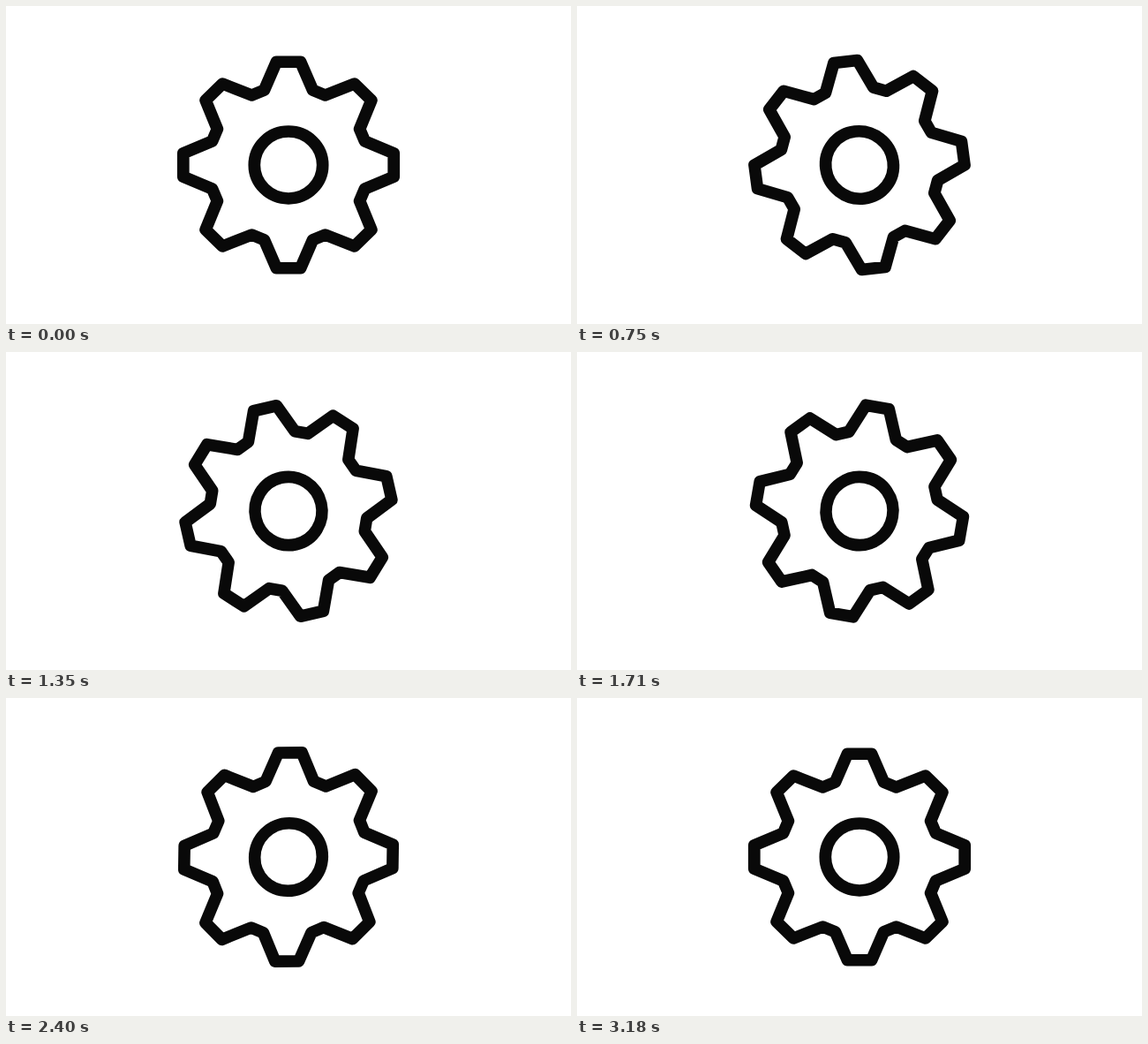
An HTML page that plays this animation: 640x360 px, repeating every 3.24 s.

```html
<!DOCTYPE html>
<html lang="en">
<head>
<meta charset="utf-8">
<title>Turning gear</title>
<style>
  html, body { margin: 0; width: 100%; height: 100%; overflow: hidden; background: #fff; }
  svg { display: block; width: 100vw; height: 100vh; }
</style>
</head>
<body>
<svg viewBox="0 0 640 360">
  <g id="gear" fill="none" stroke="#090909" stroke-width="13.6" stroke-linejoin="round">
    <polygon id="teeth"/>
    <circle r="38.3"/>
  </g>
</svg>
<script>
  const LOOP = 3240, TURN = 3180, STEP = 30, TEETH = 8;
  const TIP = { radius: 118.8, spread: 6.5 }, VALLEY = { radius: 89.8, spread: 4.8 };
  const gear = document.getElementById('gear');

  function polar(degrees, radius) {
    const a = degrees * Math.PI / 180;
    return [radius * Math.sin(a), -radius * Math.cos(a)];
  }

  // Tips and valleys alternate; each is a short flat edge
  const points = [];
  for (let i = 0; i < TEETH * 2; i++) {
    const { radius, spread } = i % 2 ? VALLEY : TIP;
    const axis = i * 180 / TEETH;
    points.push(polar(axis - spread, radius), polar(axis + spread, radius));
  }
  document.getElementById('teeth').setAttribute('points', points.join(' '));

  // Half a turn whose speed wavers, then a short rest
  const waver = [-0.4, -1.95, -3, 0.3];
  function angleAt(t) {
    const u = Math.min(t / TURN, 1);
    return waver.reduce((sum, size, i) => sum + size * Math.sin((i + 1) * Math.PI * u), 180 * u);
  }

  function draw() {
    const t = Math.floor(performance.now() % LOOP / STEP) * STEP;
    // The gear is a touch wider than tall
    gear.setAttribute('transform', `translate(320 180) rotate(${angleAt(t)}) scale(1.01 .99)`);
    requestAnimationFrame(draw);
  }
  draw();
</script>
</body>
</html>
```
